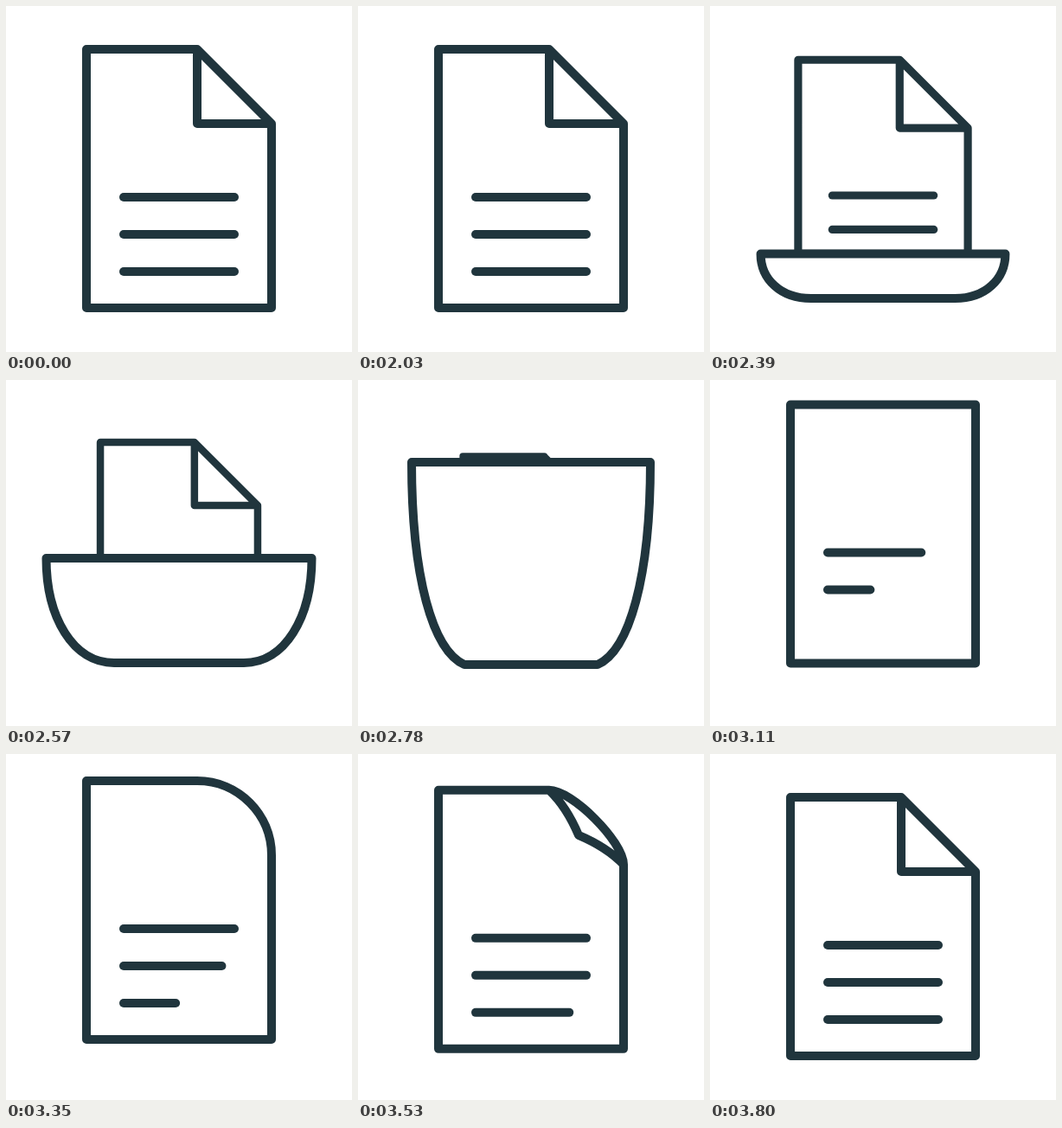
Animation, 400 px wide and 400 px high, one loop 3.89 s. Source, as an HTML page with a canvas:

```html
<!DOCTYPE html>
<html lang="en">
<head>
<meta charset="utf-8">
<title>Turning page</title>
<style>
  html, body { margin: 0; width: 100%; height: 100%; overflow: hidden; background: #fff; }
  canvas { display: block; width: 100vmin; height: 100vmin; }
</style>
</head>
<body>
<canvas id="stage" width="400" height="400"></canvas>
<script>
const ctx = document.getElementById('stage').getContext('2d');
const LOOP = 3890, START = 2030, LANDED = 3110, STEP = 30;

const clamp = v => Math.max(0, Math.min(1, v));
const mix = (a, b, p) => a + (b - a) * p;
const easeOut = u => 1 - (1 - u) ** 2;
const easeInOut = u => u * u * (3 - 2 * u);

// Smooth track through [time, value] keys, flat at peaks and at both ends.
function track(...keys) {
  const slope = i => {
    if (!keys[i - 1] || !keys[i + 1]) return 0;
    const [[t0, a], [t1, b], [t2, c]] = keys.slice(i - 1, i + 2);
    return (b - a) * (c - b) <= 0 ? 0 : (c - a) / (t2 - t0);
  };
  return t => {
    if (t <= keys[0][0]) return keys[0][1];
    const i = keys.findIndex(k => k[0] >= t);
    if (i < 0) return keys[keys.length - 1][1];
    const [t0, a] = keys[i - 1], [t1, b] = keys[i];
    const d = t1 - t0, u = (t - t0) / d, e = easeInOut(u);
    return mix(a, b, e) + d * u * (1 - u) * ((1 - u) * slope(i - 1) - u * slope(i));
  };
}

// The old page tilting back
const backTop = track([2030, 50], [2570, 72], [2780, 88], [2900, 96]);
const backScale = track([2030, 1], [2570, .85], [2780, .738], [2900, .7]);
// The loose edge swinging up, and the fold at the bottom
const edgeY = track([2030, 349], [2150, 352], [2380, 290], [2570, 206], [2780, 95], [2950, 47], [3110, 29]);
const edgeHalf = track([2030, 107], [2570, 153.5], [2780, 138], [3110, 107.5]);
const foldY = track([2030, 349], [2180, 352], [2570, 327], [2780, 329], [2930, 344], [3110, 327.5]);
const foldHalf = track([2030, 107], [2570, 75], [2780, 77], [3110, 107]);
const sag = track([2570, 1], [2780, .93], [3110, .7]);
// The new page settling
const settle = track([3110, -21.5], [3180, -24], [3350, -19], [3620, -3], [3740, 0]);

const textLength = (t, i) => easeOut(clamp((t - 2784 - 210 * i) / 537));

function drawText(lengths) {
  lengths.forEach((p, i) => {
    if (!p) return;
    const y = 171 + 43 * i;
    ctx.beginPath();
    ctx.moveTo(-64, y);
    ctx.lineTo(-64 + 128 * p, y);
    ctx.stroke();
  });
}

// r rounds the top right corner; bend turns the rounded corner into a folded one.
function drawPage(top, scale, height, r, bend, lengths) {
  ctx.save();
  ctx.translate(200, top);
  ctx.scale(scale, scale);
  ctx.beginPath();
  ctx.moveTo(107 - r, 0);
  const k = .552 * r * (1 - bend);
  ctx.bezierCurveTo(107 - r + k, 0, 107, r - k, 107, r);
  ctx.lineTo(107, height);
  ctx.lineTo(-107, height);
  ctx.lineTo(-107, 0);
  ctx.closePath();
  if (bend) {
    const tipX = mix(82, 21, bend), tipY = mix(25, 86, bend);
    ctx.moveTo(21, 0);
    ctx.quadraticCurveTo(mix(57, 21, bend), mix(0, 43, bend), tipX, tipY);
    ctx.quadraticCurveTo(mix(107, 64, bend), mix(50, 86, bend), 107, 86);
  }
  ctx.stroke();
  drawText(lengths);
  ctx.restore();
}

function drawFlap(t) {
  const y = edgeY(t), e = edgeHalf(t), bottom = foldY(t), f = foldHalf(t);
  const h = bottom - y, y1 = y + .57 * h, y2 = y + sag(t) * h, c = mix(e, f, .4);
  ctx.beginPath();
  ctx.moveTo(200 - e, y);
  ctx.lineTo(200 + e, y);
  ctx.bezierCurveTo(200 + e, y1, 200 + c, y2, 200 + f, bottom);
  ctx.lineTo(200 - f, bottom);
  ctx.bezierCurveTo(200 - c, y2, 200 - e, y1, 200 - e, y);
  ctx.closePath();
  ctx.fill();
  ctx.stroke();
}

function draw(now) {
  let t = now % LOOP;
  t = START + Math.floor((t - START) / STEP) * STEP;
  ctx.fillStyle = '#fff';
  ctx.fillRect(0, 0, 400, 400);
  ctx.strokeStyle = '#20353d';
  ctx.lineWidth = 10;
  ctx.lineCap = ctx.lineJoin = 'round';

  if (t <= START) {
    drawPage(50, 1, 299, 86, 1, [1, 1, 1]);
  } else if (t < LANDED) {
    const top = backTop(t), scale = backScale(t), edge = edgeY(t);
    if (top < edge) drawPage(top, scale, (edge - top) / scale, 86, 1, [1, 1, 1]);
    drawFlap(t);
    ctx.save();
    ctx.translate(200, 28.5);
    drawText([0, 1, 2].map(i => textLength(t, i)));
    ctx.restore();
  } else {
    const r = 86 * easeOut(clamp((t - LANDED) / 240));
    const bend = easeInOut(clamp((t - 3350) / 390));
    drawPage(50 + settle(t), 1, 299, r, bend, [0, 1, 2].map(i => textLength(t, i)));
  }
}

const begin = performance.now();
(function tick() {
  draw(performance.now() - begin);
  requestAnimationFrame(tick);
})();
</script>
</body>
</html>
```
